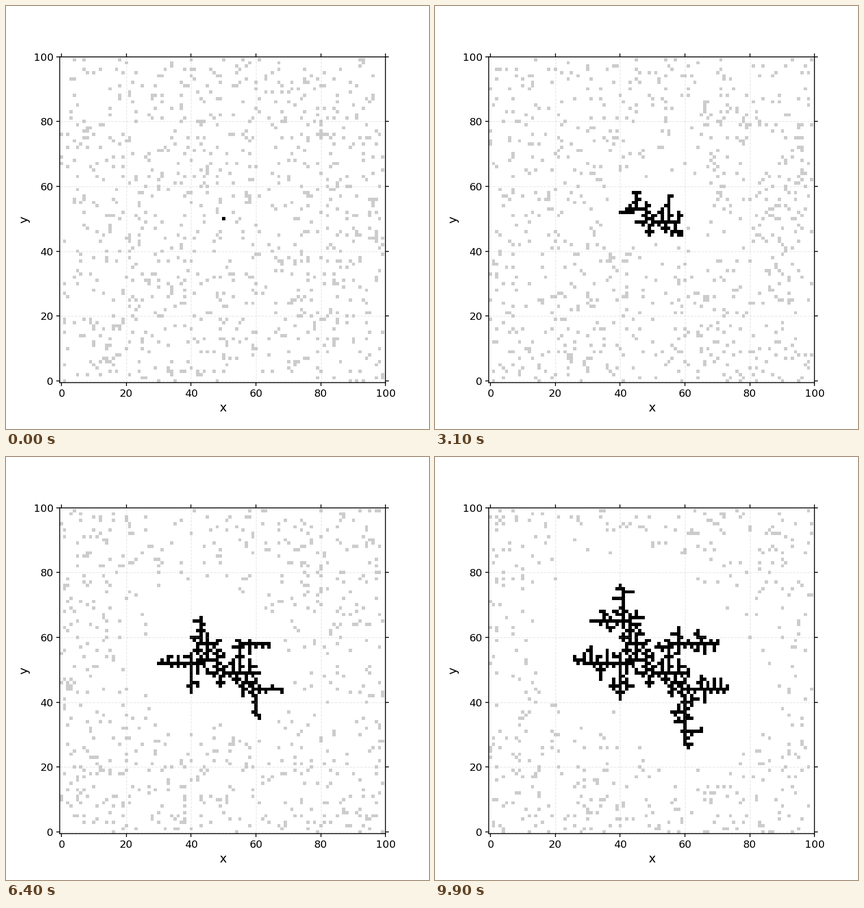
These frames come from a looping animation (748x748 px, 10 s). A matplotlib script:

```python
"""Diffusion-limited aggregation: grey walkers feed a black cluster."""
import matplotlib.pyplot as plt
import numpy as np
from matplotlib.animation import FuncAnimation
from matplotlib.colors import ListedColormap

SIZE, FRAMES, INTERVAL = 100, 100, 100
WALKERS, HOPS, SIDEWAYS = 900, 10, 0.65
YOUNG, MAX_DEPTH = 25, 5
SEED_CELL = (50, 50)
NEIGHBOURS = [(1, 0), (-1, 0), (0, 1), (0, -1)]

# Key points of the main limbs; everything else sprouts at random.
LIMBS = [
    [SEED_CELL, (48, 53), (45, 58), (43, 65), (29, 65)],
    [SEED_CELL, (50, 49), (57, 46), (59, 44), (73, 44)],
    [(45, 53), (43, 52), (29, 52)],
    [(55, 49), (55, 58), (69, 58)],
    [(59, 44), (59, 42), (60, 27)],
    [(43, 65), (41, 74)],
    [(40, 52), (40, 45)],
    [(60, 31), (65, 26)],
]


def trace(points):
    """Lattice cells along a path, each leg going sideways first."""
    cells = [points[0]]
    for x1, y1 in points[1:]:
        x, y = cells[-1]
        while (x, y) != (x1, y1):
            if x != x1:
                x += 1 if x1 > x else -1
            else:
                y += 1 if y1 > y else -1
            cells.append((x, y))
    return cells


def limb_births():
    """Frame of birth of each limb cell, from its path length to the seed."""
    length = {SEED_CELL: 0}
    for limb in LIMBS:
        cells = trace(limb)
        for i, cell in enumerate(cells):
            length.setdefault(cell, length[cells[0]] + i)
    return {cell: round(0.9 * d ** 1.33) for cell, d in length.items()}


def cluster_size(t):
    return int(1 + 2.2 * t + 0.0225 * t * t)


def around(cell):
    return [(cell[0] + dx, cell[1] + dy) for dx, dy in NEIGHBOURS]


def sprout(cluster, t, rng):
    """Pick a free cell touching exactly one young cluster cell."""
    options = []
    for parent, (born, depth) in cluster.items():
        if t - born > YOUNG or depth >= MAX_DEPTH:
            continue
        for cell in around(parent):
            touching = sum(n in cluster for n in around(cell))
            if cell not in cluster and touching == 1:
                options.append((cell, depth + 1))
    return options[rng.integers(len(options))] if options else None


def hop(walkers, halo, rng):
    n = len(walkers)
    step = np.zeros((n, 2), int)
    axis = (rng.random(n) > SIDEWAYS).astype(int)
    step[np.arange(n), axis] = rng.choice([-1, 1], n)
    moved = (walkers + step) % SIZE
    blocked = halo[moved[:, 1], moved[:, 0]]
    return np.where(blocked[:, None], walkers, moved)


def simulate(seed=7):
    rng = np.random.default_rng(seed)
    births = limb_births()
    walkers = rng.integers(0, SIZE, (WALKERS, 2))
    solid = np.zeros((SIZE, SIZE), bool)
    cluster, states = {}, []

    for t in range(FRAMES):
        if t:
            halo = solid.copy()
            for dx, dy in NEIGHBOURS:
                halo |= np.roll(solid, (dy, dx), (0, 1))
            for _ in range(HOPS):
                walkers = hop(walkers, halo, rng)

        new = {cell: (t, 0) for cell, born in births.items()
               if born == t and cell not in cluster}
        cluster.update(new)
        while len(cluster) < cluster_size(t):
            twig = sprout(cluster, t, rng)
            if twig is None:
                break
            cell, depth = twig
            cluster[cell] = new[cell] = (t, depth)

        # Each new cell uses up a walker from close by.
        for x, y in new:
            solid[y, x] = True
            distance = np.hypot(*(walkers - (x, y)).T)
            caught = np.argmin(distance * rng.uniform(1, 2, len(walkers)))
            walkers = np.delete(walkers, caught, axis=0)

        grid = np.zeros((SIZE, SIZE), int)
        grid[walkers[:, 1], walkers[:, 0]] = 1
        grid[solid] = 2
        states.append(grid)
    return states


states = simulate()

plt.rcParams["axes.linewidth"] = 1
fig, ax = plt.subplots(figsize=(6.8, 6.8), dpi=110)
image = ax.imshow(states[0], origin="lower", interpolation="nearest",
                  cmap=ListedColormap(["white", "0.8", "black"]),
                  vmin=0, vmax=2)
ticks = range(0, SIZE + 1, 20)
ax.set(xlim=(-0.5, SIZE), ylim=(-0.5, SIZE), xticks=ticks, yticks=ticks)
ax.set_xlabel("x", fontsize=14)
ax.set_ylabel("y", fontsize=14)
ax.tick_params(top=True, right=True, labelsize=12, length=4, width=1)
ax.grid(linestyle="--", linewidth=0.8, alpha=0.3)


def update(i):
    image.set_data(states[i])
    return [image]


anim = FuncAnimation(fig, update, frames=FRAMES, interval=INTERVAL,
                     repeat=True, repeat_delay=0)
plt.show()
```
